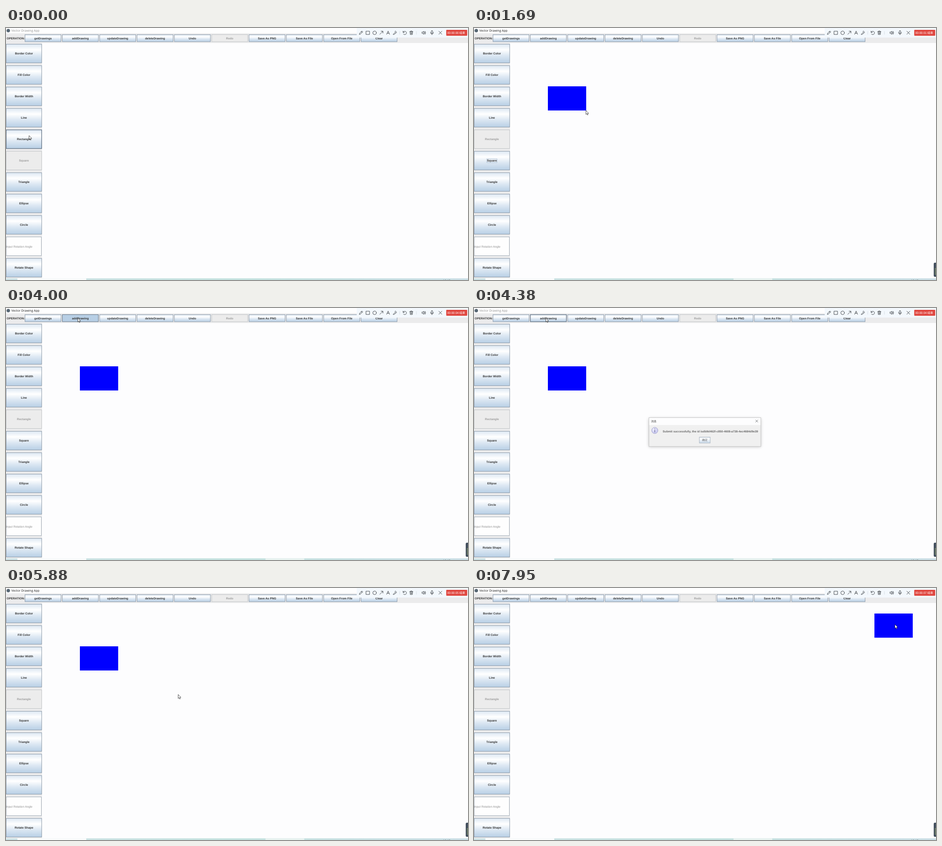
An HTML page for the animation above (8 s loop, 1013x553 px).

```html
<!DOCTYPE html>
<html lang="en">
<head>
<meta charset="utf-8">
<title>Vector Drawing App</title>
<style>
html, body { margin: 0; width: 100%; height: 100%; overflow: hidden; background: #fdfdfe; }
svg { display: block; width: 1013px; height: 553px; }
text { font: 6.4px "Liberation Sans", Arial, sans-serif; text-rendering: geometricPrecision; fill: #333; }
.bold, .btn text { font-weight: 700; }
.mid, .btn text { text-anchor: middle; }
.cjk { font-family: "Noto Sans CJK SC", "Noto Sans CJK", sans-serif; }
.btn rect { fill: url(#steel); stroke: #8c9aa9; }
.btn.hover rect { stroke: #5f7083; stroke-width: 1.3; }
.btn.down rect { fill: #b8cfe5; stroke: #5f7083; }
.btn.off rect { fill: #ececec; stroke: #c0c3c6; }
.btn.off text { fill: #9c9c9c; }
.icon { fill: none; stroke: #34383d; stroke-width: .9; stroke-linecap: round; stroke-linejoin: round; }
</style>
</head>
<body>
<svg id="stage" viewBox="0 0 1013 553">
  <defs>
    <linearGradient id="steel" x2="0" y2="1">
      <stop offset="0" stop-color="#dde8f3"/>
      <stop offset=".3" stop-color="#fff"/>
      <stop offset=".6" stop-color="#dde8f3"/>
      <stop offset="1" stop-color="#b8cfe5"/>
    </linearGradient>
    <linearGradient id="bar">
      <stop offset="0" stop-color="#cfe3e6"/>
      <stop offset=".5" stop-color="#c4e2df"/>
      <stop offset="1" stop-color="#cbdfe6"/>
    </linearGradient>
    <radialGradient id="ball" cx=".4" cy=".35">
      <stop offset="0" stop-color="#f2f2ff"/>
      <stop offset="1" stop-color="#bcbcf0"/>
    </radialGradient>
    <filter id="soft" x="-10%" y="-30%" width="120%" height="160%"><feGaussianBlur stdDeviation="4"/></filter>
  </defs>

  <rect width="1013" height="553" fill="#fdfdfe"/>
  <rect y="11.5" width="1013" height="21.5" fill="#ebebec"/>
  <rect y="33" width="79" height="516" fill="#ebebec"/>
  <rect width="1013" height="11.5" fill="#fefefe"/>
  <circle cx="5" cy="5.8" r="3.8" fill="#566672"/>
  <text id="title" x="11.8" y="8" style="font:6.7px 'Open Sans','Noto Sans',sans-serif">Vector Drawing App</text>
  <text class="bold" x="1.5" y="24.7">OPERATION:</text>
  <g id="buttons"></g>
  <rect id="focus" x="28" y="287" width="22.5" height="8.5" fill="none" stroke="#9db3c9" stroke-width=".7"/>
  <rect x=".5" y="458.5" width="77" height="41" fill="#fefefe" stroke="#a3adb8"/>
  <text x="0.2" y="481.6" style="fill:#8f8f8f">Input Rotation Angle</text>

  <rect id="box" width="84" height="53" fill="#00f"/>

  <g id="taskbar">
    <rect y="549.3" width="1013" height="4" fill="url(#bar)"/>
    <rect x="25" y="549.3" width="151" height="4" fill="#fcfdfd"/>
    <rect id="task" x="569" y="549.3" width="85" height="4" fill="#e9f3f1"/>
    <text x="958" y="557" style="font-size:6.6px">16:12</text>
  </g>
  <g id="tab">
    <path d="M1013 515h-2.5q-2.5 0-2.5 3v25q0 3 2.5 3h2.5z" fill="#434f5e"/>
    <path d="M1011.5 527v15" stroke="#9db36a" stroke-width="1.4" stroke-dasharray="2 1"/>
  </g>

  <g id="recorder">
    <rect x="769" width="244" height="21" fill="#f3f8fd"/>
    <g class="icon">
      <path d="M774.8 13.8l.8-2.6 4.8-4.6 1.8 1.8-4.8 4.6zM779 8l1.8 1.8"/>
      <rect x="789.7" y="7" width="7.4" height="7.2"/>
      <circle cx="808.2" cy="10.6" r="3.9"/>
      <path d="M819.5 14l6.8-6.8M822.3 7h4.2v4.2"/>
      <path d="M834.6 14l3.2-7.3 3.2 7.3M835.8 11.5h4"/>
      <path d="M849 13.8l4.6-4.6 1.6 1.6-4.4 3.5zM852.4 8l1.5-1.4 2.6 2.6-1.4 1.4"/>
      <path d="M870.6 6.8v2.9h2.9M871 9.3a3.7 3.7 0 1 1 .3 3.6"/>
      <path d="M885 8h7.4M887.2 8V6.7h3V8M886 8l.4 6.3h4.6l.4-6.3M888 10v2.5M889.6 10v2.5"/>
      <path d="M912.2 9v3h1.7l2.2 2V7l-2.2 2zM917.8 8.8q1.2 1.7 0 3.4M919 7.2q2.4 3.3 0 6.6"/>
      <rect x="932.4" y="5.9" width="3.2" height="5.4" rx="1.6"/>
      <path d="M930.6 9.8q.2 3.2 3.4 3.2t3.4-3.2M934 13v1.8"/>
      <path d="M949 7l6.8 6.8M955.8 7l-6.8 6.8"/>
      <path d="M863.3 7.5v6.5M899.8 7.5v6.5" stroke="#ccd3da" stroke-width=".7"/>
    </g>
    <rect x="965.3" y="4" width="46" height="13" rx="1.3" fill="#e0463f"/>
    <text id="clock" class="cjk" x="967.7" y="12.9" style="fill:#fff"></text>
  </g>

  <g id="dialog">
    <rect id="shade" x="382" y="242" width="248" height="63" fill="#000" filter="url(#soft)"/>
    <rect x="382.3" y="240.3" width="248" height="64" fill="#ececec"/>
    <rect x="382.3" y="240.3" width="248" height="16.4" fill="#fefefe"/>
    <rect x="382.3" y="240.3" width="248" height="64" fill="none" stroke="#a2a2a2" stroke-width=".8"/>
    <text id="caption" class="cjk" x="386.6" y="250.4" style="font-size:6.3px">消息</text>
    <path id="close" class="icon" d="M618.7 245.4l5 5M623.7 245.4l-5 5"/>
    <circle cx="395.2" cy="268.7" r="6.9" fill="url(#ball)" stroke="#7c7cae" stroke-width=".9"/>
    <path d="M395.2 264.2v1.6M395.2 267.2v5.6" stroke="#3a3a78" stroke-width="1.4"/>
    <text class="bold" x="412.8" y="272.8">Submit successfully, the id isdb9d462f-c850-4608-a738-4ec4684d9e39</text>
    <g id="ok" class="btn">
      <rect x="494" y="283.5" width="24" height="13"/>
      <text class="cjk" x="506" y="292.7" style="font-weight:400;font-size:6.2px">确定</text>
    </g>
  </g>

  <path id="cursor" d="M0 0V8.6L2 6.8 3.3 9.8 4.7 9.2 3.4 6.3H6Z" fill="#fff" stroke="#111" stroke-width=".7"/>
</svg>
<script>
const LOOP = 8000;
const NS = 'http://www.w3.org/2000/svg';
const $ = id => document.getElementById(id);

function add(parent, name, attrs, label) {
  const node = document.createElementNS(NS, name);
  for (const key in attrs) node.setAttribute(key, attrs[key]);
  if (label) node.textContent = label;
  return parent.appendChild(node);
}

function button(label, x, y, w, h, baseline) {
  const g = add($('buttons'), 'g', { class: 'btn' });
  add(g, 'rect', { x, y, width: w, height: h });
  add(g, 'text', { x: x + w / 2, y: baseline }, label);
  return g;
}

const tools = ['getDrawings', 'addDrawing', 'updateDrawing', 'deleteDrawing', 'Undo', 'Redo',
  'Save As PNG', 'Save As File', 'Open From File', 'Clear']
  .map((s, i) => button(s, 41.7 + i * 81.87, 14.5, 79, 15.5, 24.7));
const shapes = ['Border Color', 'Fill Color', 'Border Width', 'Line', 'Rectangle', 'Square',
  'Triangle', 'Ellipse', 'Circle', '', 'Rotate Shape']
  .map((s, i) => s && button(s, 0.5, 35.5 + i * 47, 77.7, 41, 58.3 + i * 47));
const [, addBtn, , , , redoBtn] = tools;
const [, , , , rectBtn, squareBtn] = shapes;

// time, x, y
const path = [
  [0, 50.5, 236], [890, 50.5, 236], [1270, 162, 128], [1410, 162, 128], [1550, 245.4, 181],
  [1930, 245.4, 181], [2260, 197, 158], [2400, 197, 158], [2540, 203.4, 155],
  [3250, 203.4, 155], [3810, 157.5, 22], [4850, 157.5, 22], [5270, 503.6, 290],
  [5690, 503.6, 290], [6120, 201, 155], [6260, 201, 155], [6960, 917, 83],
  [7480, 917, 83], [7950, 923, 80], [LOOP, 923, 80]
];
const ticks = [1050, 2030, 3010, 4000, 4990, 5960, 6940];

const clamp = v => Math.max(0, Math.min(1, v));
const smooth = v => v * v * (3 - 2 * v);
const within = (t, a, b) => t >= a && t < b;

function pointAt(t) {
  const i = path.findIndex((p, n) => n && t < p[0]);
  const [t0, x0, y0] = path[i - 1], [t1, x1, y1] = path[i];
  const k = smooth((t - t0) / (t1 - t0));
  return [x0 + (x1 - x0) * k, y0 + (y1 - y0) * k];
}

function state(node, name) { node.setAttribute('class', 'btn ' + name); }
function show(id, on) { $(id).style.display = on ? '' : 'none'; }

function drawDialog(t) {
  const opening = clamp((t - 4240) / 190);
  const closing = clamp((t - 5350) / 230);
  const active = t < 5340;
  const alpha = opening * (1 - closing);
  const scale = 1 - 0.055 * (1 - opening) ** 1.2 - 0.06 * closing * closing;
  show('dialog', alpha > 0);
  $('dialog').setAttribute('opacity', alpha);
  $('dialog').setAttribute('transform', `translate(506.3 272.3) scale(${scale}) translate(-506.3 -272.3)`);
  $('shade').setAttribute('opacity', active ? 0.32 : 0.16);
  $('caption').style.fill = active ? '#111' : '#8a8a8a';
  show('close', active);
  state($('ok'), t >= 5300 ? 'down' : t >= 5210 ? 'hover' : '');
}

function draw(t) {
  const [x, y] = pointAt(t);
  $('cursor').setAttribute('transform', `translate(${x} ${y})`);
  $('clock').textContent = `00:00:0${ticks.filter(v => t >= v).length} 结束`;

  const chosen = t >= 100;
  state(redoBtn, 'off');
  state(rectBtn, chosen ? 'off' : t >= 50 ? 'down' : 'hover');
  state(squareBtn, chosen ? '' : 'off');
  state(addBtn, within(t, 4000, 4100) ? 'down' : within(t, 3720, 4920) ? 'hover' : '');
  show('focus', within(t, 100, 4000));

  const idle = t < 50 || within(t, 4240, 5340);
  $('title').style.fill = idle ? '#8e8e8e' : '#111';

  const moved = t >= 7150;
  show('box', t >= 1690);
  $('box').setAttribute('x', moved ? 878 : 162);
  $('box').setAttribute('y', moved ? 56 : 128);

  show('tab', t >= 1050);
  show('task', t >= 1050);
  drawDialog(t);
}

const start = performance.now();
function frame(now) {
  draw(Math.max(0, now - start) % LOOP);
  requestAnimationFrame(frame);
}
draw(0);
requestAnimationFrame(frame);
</script>
</body>
</html>
```
